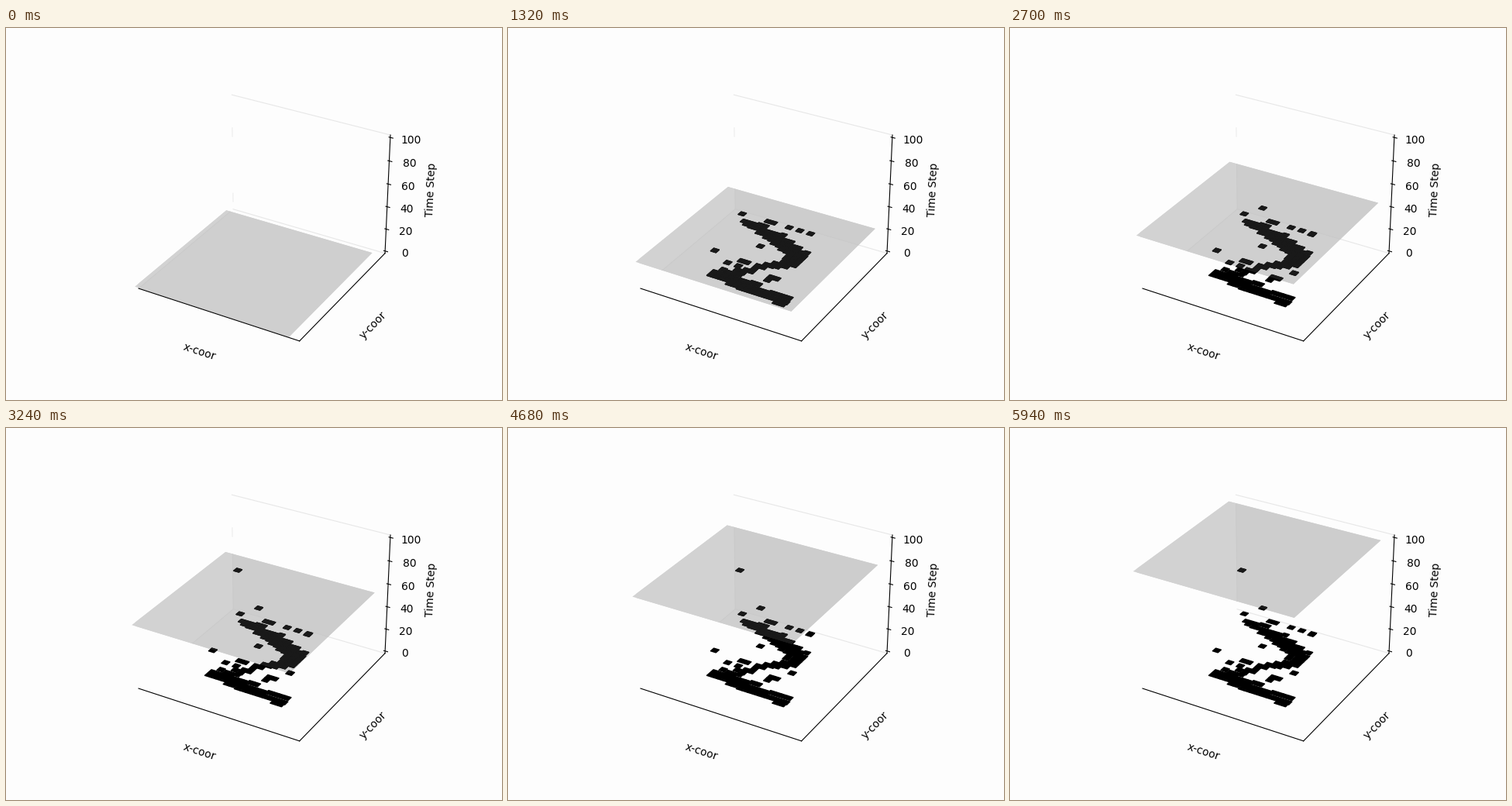
Animation of 640 by 480 pixels, one loop 6000 ms. Source, as a matplotlib script:

```python
import numpy as np
import matplotlib.pyplot as plt
from matplotlib.animation import FuncAnimation
from matplotlib.collections import PolyCollection
from matplotlib.patches import Polygon

W, H = 640, 480
N, STEPS = 28, 100
PAPER, EDGE = "#fdfdfd", "#e7e7e7"
AZIM, ELEV, DIST = np.radians(-60), np.radians(30), 10
BOX = np.array([4, 4, 3]) * 1.8294640721620434 / np.sqrt(41)
SIDE = 0.77 * H                      # the drawing area is a square
SCALE = SIDE / 0.185
ORIGIN = (0.5125 * W - SIDE / 2 + 0.095 * SCALE, 0.89 * H - 0.095 * SCALE)

RIGHT = np.array([-np.sin(AZIM), np.cos(AZIM), 0])
TOWARD = np.array([np.cos(ELEV) * np.cos(AZIM), np.cos(ELEV) * np.sin(AZIM), np.sin(ELEV)])
UP = np.cross(TOWARD, RIGHT)

# Pen path of the digit: column, row, radius
STROKE = np.array([
    (6.8, 22.4, 0.8), (12, 21, 1.3), (16.5, 19.2, 1.6), (19.8, 17.3, 1.6),
    (19.8, 15, 1.4), (18, 13.4, 1.1), (16, 11.4, 0.8), (14.3, 8.3, 0.8),
    (10.3, 6, 0.9), (17, 5.5, 1.4), (21.5, 4.9, 0.7), (24.2, 4.4, 1.15),
])
STROKE_STEP = 12
# Faint pixels around it: row, time step, columns
SPECKS = [
    (23, 15, (5, 10, 11, 14, 16, 18)), (17, 10, (12,)), (11, 14, (7,)),
    (11, 12, (12, 13)), (10, 10, (10, 12)), (10, 9, (18, 19)), (9, 9, (18,)),
    (19, 27, (20,)), (6, 32, (24,)), (24, 22, (8,)), (24, 51, (4,)),
]


def project(x, y, t):
    p = (np.array([x / N, y / N, t / STEPS]) - 0.5) * BOX
    depth = DIST - p @ TOWARD
    return (ORIGIN[0] + SCALE * (p @ RIGHT) / depth,
            ORIGIN[1] - SCALE * (p @ UP) / depth)


def flat_square(x0, x1, y0, y1, t):
    return [project(x, y, t) for x, y in ((x0, y0), (x1, y0), (x1, y1), (x0, y1))]


def stroke_cells():
    """Pixels under the pen; those near its rim fire one step later."""
    knots = np.arange(len(STROKE))
    s = np.linspace(0, knots[-1], 400)
    px, py, radius = (np.interp(s, knots, column) for column in STROKE.T)
    for j in range(N):
        for i in range(N):
            gap = (np.hypot(px - i - 0.5, py - j - 0.5) - radius).min()
            if gap < 0:
                yield i, j, STROKE_STEP + (gap > -0.3)


cells = list(stroke_cells()) + [(i, j, t) for j, t, columns in SPECKS for i in columns]
times = np.array([t for _, _, t in cells])
tiles = np.array([flat_square(i - 1, i, j - 1, j, t) for i, j, t in cells])

fig = plt.figure(figsize=(W / 100, H / 100), dpi=100, facecolor=PAPER)
ax = fig.add_axes([0, 0, 1, 1])
ax.set(xlim=(0, W), ylim=(H, 0))
ax.axis("off")


def line(points, color="black", width=0.8, z=5):
    return ax.plot(*zip(*points), color=color, lw=width, zorder=z)[0]


# Box corners, a little outside the data limits
lo, hi = -N / 48, N + N / 48
bottom, top = -STEPS / 48, STEPS + STEPS / 48
left0, front0 = project(lo, lo, bottom), project(hi, lo, bottom)
right0, back0 = project(hi, hi, bottom), project(lo, hi, bottom)
left1, right1, back1 = project(lo, lo, top), project(hi, hi, top), project(lo, hi, top)

line([back1, right1], EDGE, z=0)
line([back0, right0], EDGE, z=0)
for t0, t1 in ((5, 13), (65, 73)):
    line([project(lo, hi, t0), project(lo, hi, t1)], EDGE, 0.6, 0)

# The sheet shows the walls of the box faintly through it
sheet = ax.add_patch(Polygon(flat_square(-1, N - 1, -1, N - 1, 0),
                             fc="#d2d2d2", ec="none", zorder=1))
walls = [
    ax.add_patch(Polygon(corners, fc=color, ec="none", zorder=2))
    for corners, color in (
        ([left0, back0, back1, left1], "#d2d2d2"),
        ([back0, right0, right1, back1], "#cdcdcd"),
        ([left0, front0, right0, back0], "#cfcfcf"),
    )
]
seams = [line([back0, end], "#c9c9c9", 0.6, 2.5) for end in (left0, right0, back1)]


def tile_layer(color, z):
    layer = PolyCollection([], facecolors=color, edgecolors=color, linewidths=1, zorder=z)
    return ax.add_collection(layer, autolim=False)


dark, veiled = tile_layer("black", 3), tile_layer("#191919", 4)

# Text stands off the box by a number of points, in units of a twelfth of an axis
per_point = 48 / (2 * 72 * SIDE / 100) / 12
tick_gap, label_gap = 11.5 * per_point, 25 * per_point


def axis_label(text, position, start, end):
    angle = np.degrees(np.arctan2(start[1] - end[1], end[0] - start[0]))
    ax.text(*project(*position), text, size=10, rotation=angle,
            rotation_mode="anchor", ha="center", va="center")


line([left0, front0])
line([front0, right0])
line([right0, right1])
for value in range(0, 101, 20):
    line([project(hi - N / 120, hi, value), project(hi + N / 60, hi, value)])
    away = hi + N * tick_gap
    ax.text(*project(away, away, value), str(value), size=10, ha="center", va="top")

near, far = lo - N * label_gap, hi + N * label_gap
below = bottom - STEPS * label_gap
axis_label("x-coor", (N / 2, near, below), left0, front0)
axis_label("y-coor", (far, N / 2, below), front0, right0)
axis_label("Time Step", (far, far, STEPS / 2), right0, right1)


def update(step):
    sheet.set_xy(flat_square(-1, N - 1, -1, N - 1, step))
    fired = tiles[times < step]
    dark.set_verts(fired)
    veiled.set_verts(fired)
    for artist in (*walls, *seams, veiled):
        artist.set_clip_path(sheet)
    return []


anim = FuncAnimation(fig, update, frames=STEPS, interval=60, repeat=True,
                     repeat_delay=0, init_func=lambda: update(0), blit=False)
plt.show()
```
